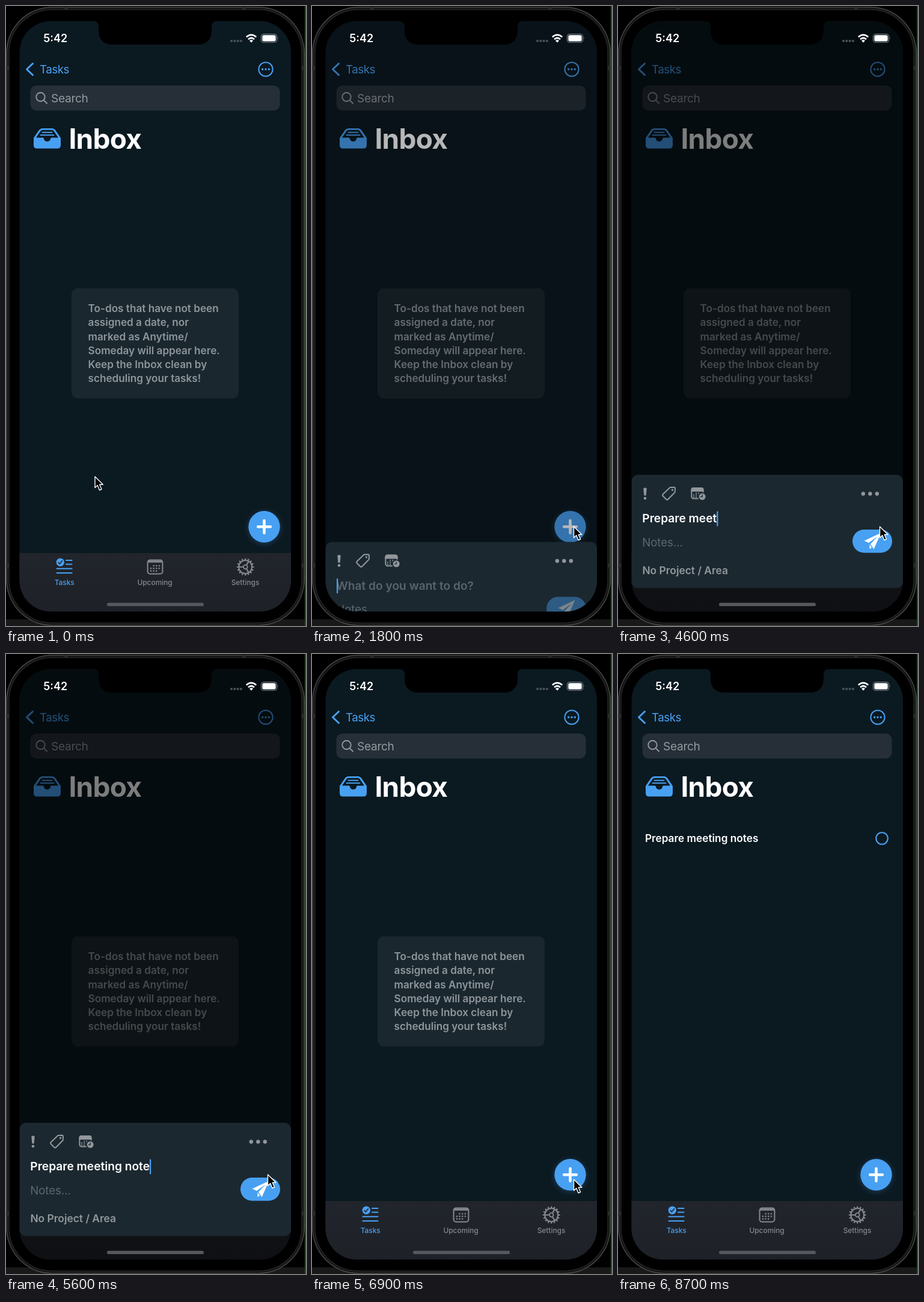
An HTML page that plays this animation: 499 px wide and 1029 px high, repeating every 9.23 s.

```html
<!DOCTYPE html>
<html lang="en">
<head>
<meta charset="utf-8">
<title>Inbox quick entry</title>
<style>
  html, body { margin: 0; width: 100%; height: 100%; overflow: hidden; background: #000; }
  svg { display: block; width: 499px; height: 1029px; }
  text { font-family: Inter, Roboto, "Open Sans", sans-serif; white-space: pre; }
  .line { fill: none; stroke-linecap: round; stroke-linejoin: round; }
  .semi { font-weight: 600; }
  .tab { font-size: 11.9px; font-weight: 500; text-anchor: middle; }
</style>
</head>
<body>
<svg viewBox="0 0 499 1029" xmlns="http://www.w3.org/2000/svg">
  <defs>
    <clipPath id="screen"><rect x="22.5" y="25" width="451.5" height="980" rx="52"/></clipPath>
    <filter id="glow" x="-50%" y="-50%" width="200%" height="200%"><feGaussianBlur stdDeviation="5"/></filter>
    <linearGradient id="barFill" x2="0" y2="1">
      <stop offset="0" stop-color="#21252c"/><stop offset="1" stop-color="#1e2127"/>
    </linearGradient>
  </defs>

  <!-- Phone body -->
  <rect width="499" height="1029" fill="#000"/>
  <rect y="1018" width="499" height="11" fill="#191919"/>
  <rect x="1" y="2" width="495" height="1026" rx="76" fill="#151515" stroke="#484848" stroke-width="1.6"/>
  <rect x="5" y="6" width="487" height="1018" rx="72" fill="#000" stroke="#262626" stroke-width="1.4"/>
  <g fill="#2b2b2b">
    <rect x="97" y="2" width="6" height="4"/><rect x="393" y="2" width="6" height="4"/>
    <rect x="1" y="99" width="4" height="7"/><rect x="492" y="99" width="4" height="7"/>
    <rect x="1" y="925" width="4" height="7"/><rect x="492" y="925" width="4" height="7"/>
  </g>
  <rect x="497" width="2" height="1029" fill="#08650f"/>

  <g clip-path="url(#screen)">
    <rect x="22" y="25" width="453" height="981" fill="#0b1921"/>

    <!-- Navigation and search -->
    <g class="line" stroke="#48a0f2">
      <path d="M44.5 95.5 L34.5 105 L44.5 114.5" stroke-width="3"/>
      <circle cx="432" cy="105" r="11.6" stroke-width="2"/>
    </g>
    <g fill="#48a0f2">
      <circle cx="426.7" cy="105" r="1.7"/><circle cx="432" cy="105" r="1.7"/><circle cx="437.3" cy="105" r="1.7"/>
      <text x="56" y="112" font-size="18.8" letter-spacing="-.5">Tasks</text>
    </g>
    <rect x="40.5" y="132" width="415" height="41.5" rx="10" fill="#262f37"/>
    <g class="line" stroke="#929aa0" stroke-width="1.9">
      <circle cx="57.5" cy="151" r="7.2"/><path d="M62.8 156.3 L68 161.5"/>
    </g>
    <text x="75" y="160" font-size="19.2" letter-spacing="-.35" fill="#929aa0">Search</text>

    <!-- Heading -->
    <path d="M46 219 L54.5 206.5 Q57 203 61 203 H76 Q80 203 82.5 206.5 L91 219 V231 Q91 236.5 85.5 236.5 H51.5 Q46 236.5 46 231 Z" fill="#48a0f2"/>
    <path d="M50 218.5 L57.5 207.5 Q58.7 205.8 61 205.8 H76 Q78.3 205.8 79.5 207.5 L87 218.5 H76 Q74 218.5 74 220 A5.5 5 0 0 1 63 220 Q63 218.5 61 218.5 Z" fill="#0b1921"/>
    <path class="line" d="M60.5 209.7 H76.5 M57.5 214.3 H79.5" stroke="#48a0f2" stroke-width="2"/>
    <text x="104.4" y="236.5" font-size="46" font-weight="700" letter-spacing="-.75" fill="#fff">Inbox</text>

    <g id="hint">
      <rect x="109" y="468.5" width="278" height="183" rx="11" fill="#1a272e"/>
      <g id="hintLines" class="semi" font-size="17.15" fill="#8e969b"></g>
    </g>
    <g id="task">
      <text class="semi" x="44.9" y="312" font-size="17.25" fill="#fff">Prepare meeting notes</text>
      <circle class="line" cx="439" cy="306" r="9.8" stroke="#48a0f2" stroke-width="2.1"/>
    </g>

    <!-- Tab bar -->
    <rect x="22" y="908" width="453" height="98" fill="url(#barFill)"/>
    <circle cx="90.3" cy="923.3" r="6.7" fill="#48a0f2"/>
    <path class="line" d="M87.2 923.6 L89.4 926 L93.4 920.8" stroke="#20252c" stroke-width="1.6"/>
    <path class="line" d="M100 920 H109.5 M100 926.5 H109.5 M84.5 933.8 H109.5 M84.5 941 H109.5" stroke="#48a0f2" stroke-width="2.1"/>
    <g class="line" stroke="#85898d">
      <rect x="235.6" y="919.5" width="24.8" height="23" rx="4" stroke-width="2"/>
      <path d="M237 922 H259" stroke-width="3.4"/>
      <path id="gear" stroke-width="2.2" stroke-linecap="butt"/>
      <circle cx="398.2" cy="931" r="11" stroke-width="2.2"/>
      <circle cx="398.2" cy="931" r="3.3" stroke-width="1.8"/>
    </g>
    <g id="monthDots" fill="#85898d"></g>
    <text class="tab" x="97.2" y="961" fill="#48a0f2">Tasks</text>
    <text class="tab" x="247.6" y="961" fill="#85898d">Upcoming</text>
    <text class="tab" x="398" y="961" fill="#85898d">Settings</text>

    <!-- Add button -->
    <circle cx="429.5" cy="866" r="27" fill="#48a0f2" opacity=".25" filter="url(#glow)"/>
    <circle cx="429.5" cy="864.3" r="26.2" fill="#48a0f2"/>
    <path class="line" d="M419.2 864.3 H439.8 M429.5 854 V874.6" stroke="#fff" stroke-width="4.6"/>

    <rect id="shade" x="22" y="25" width="453" height="981" fill="#000"/>
    <rect x="168" y="990.5" width="161" height="5.6" rx="2.8" fill="#55585d"/>

    <!-- Entry sheet -->
    <g id="sheet">
      <rect x="22.5" y="778" width="451.5" height="188" rx="11" fill="#1b2830"/>
      <g fill="#91979b">
        <path d="M42.3 801 Q42.3 799.5 45 799.5 Q47.7 799.5 47.7 801 L46.6 812.5 H43.4 Z"/><circle cx="45" cy="817" r="2.3"/>
        <circle cx="407.8" cy="809.5" r="3.2"/><circle cx="419.3" cy="809.5" r="3.2"/><circle cx="430.8" cy="809.5" r="3.2"/>
        <path d="M121.5 803 Q121.5 799 125.5 799 H138.5 Q142.5 799 142.5 803 V806 H121.5 Z"/>
      </g>
      <g class="line" stroke="#91979b" stroke-width="2">
        <path d="M86.5 799 L93 798.8 Q95 798.8 95 801 L94.7 807 L83.5 818.5 Q81.8 820.2 80 818.5 L75 813.5 Q73.3 811.7 75 810 Z"/>
        <circle cx="90.5" cy="803.3" r="1" stroke-width="1.4"/>
        <rect x="122.4" y="800" width="19.2" height="17.6" rx="3.2"/>
      </g>
      <g id="sheetDots" fill="#91979b"></g>
      <circle cx="140.2" cy="814.3" r="6.4" fill="#91979b" stroke="#1b2830" stroke-width="1.8"/>
      <path class="line" d="M140.2 811 V814.5 H137.5" stroke="#1b2830" stroke-width="1.3"/>
      <text id="placeholder" class="semi" x="40.3" y="857" font-size="19.15" fill="#59646b">What do you want to do?</text>
      <text id="title" class="semi" x="40.3" y="857" font-size="19.15" fill="#fff"></text>
      <rect id="caret" y="838.5" width="2.2" height="25" rx="1" fill="#48a0f2"/>
      <text x="40.2" y="896.5" font-size="18.6" fill="#5d676d">Notes...</text>
      <text class="semi" x="40.4" y="943" font-size="17.4" fill="#91979b">No Project / Area</text>
      <g id="send">
        <rect x="390" y="869" width="66" height="38.5" rx="19.2" fill="#48a0f2"/>
        <path d="M437.5 874.5 L409.5 887.5 L417 891 L431.5 880.5 L420 893 L425.5 901.5 Z M418.5 893.5 L422.2 899 L418.5 901 Z" fill="#fff"/>
      </g>
    </g>
  </g>

  <!-- Notch and status bar -->
  <path d="M145 24 V25 Q154 25 154 34 V40 Q154 64 178 64 H318 Q342 64 342 40 V34 Q342 25 351 25 V24 Z" fill="#000"/>
  <text class="semi" x="62.3" y="60" font-size="18" fill="#fff">5:42</text>
  <g fill="#48535a">
    <circle cx="375" cy="58" r="2.1"/><circle cx="380.3" cy="58" r="2.1"/><circle cx="385.6" cy="58" r="2.1"/><circle cx="390.9" cy="58" r="2.1"/>
  </g>
  <g fill="none" stroke="#fff" stroke-width="2.7">
    <path d="M399.8 51.5 Q408 44.3 416.2 51.5"/><path d="M403 55.2 Q408 50.8 413 55.2"/>
  </g>
  <path d="M405 57.5 Q408 55 411 57.5 L408 60.7 Z" fill="#fff"/>
  <rect x="424.5" y="46.5" width="26" height="14" rx="4.3" fill="none" stroke="#79828a" stroke-width="1.2"/>
  <rect x="426.3" y="48.2" width="22.4" height="10.6" rx="2.7" fill="#fff"/>
  <path d="M452 51.3 Q453.8 53.5 452 55.8 Z" fill="#79828a"/>

  <circle id="tap" r="23.5" fill="#bcbebf" opacity=".82"/>
  <path id="pointer" d="M0 0 V18.5 L4.2 14.6 L7.5 22.5 L11 21 L7.7 13.3 H13.3 Z" fill="#000" stroke="#fff" stroke-width="1.4" stroke-linejoin="round"/>
</svg>

<script>
const LOOP = 9230, STEP = 100;
const el = id => document.getElementById(id);
const set = (id, name, value) => el(id).setAttribute(name, value);
const show = (id, visible) => el(id).style.display = visible ? '' : 'none';
const clamp = v => Math.max(0, Math.min(1, v));
const progress = (t, from, to) => clamp((t - from) / (to - from));
const smooth = p => p * p * (3 - 2 * p);
const mix = (a, b, p) => a + (b - a) * p;

function dotGrid(id, x, y, dx, dy, r) {
  let out = '';
  for (let row = 0; row < 3; row++)
    for (let col = 0; col < 4; col++) {
      const missing = (row === 0 && col === 0) || (row === 2 && col === 3);
      if (!missing) out += `<circle cx="${x + col * dx}" cy="${y + row * dy}" r="${r}"/>`;
    }
  el(id).innerHTML = out;
}

function buildStatic() {
  const lines = ['To-dos that have not been', 'assigned a date, nor', 'marked as Anytime/',
    'Someday will appear here.', 'Keep the Inbox clean by', 'scheduling your tasks!'];
  el('hintLines').innerHTML = lines.map((s, i) =>
    `<text x="136.6" y="${508 + i * 23.25}">${s}</text>`).join('');
  dotGrid('monthDots', 241, 929, 4.6, 4.3, 1.3);
  dotGrid('sheetDots', 126, 808.5, 4.1, 3.2, 1.1);

  const ray = (angle, r1, r2) => {
    const c = Math.cos(angle), s = Math.sin(angle);
    return `M${398.2 + r1 * c} ${931 + r1 * s} L${398.2 + r2 * c} ${931 + r2 * s}`;
  };
  let d = '';
  for (let i = 0; i < 16; i++) d += ray(i * Math.PI / 8, 11.5, 14.3);
  for (let i = 0; i < 3; i++) d += ray(Math.PI + i * Math.PI * 2 / 3, 4, 10.5);
  set('gear', 'd', d);
}

const FULL_TITLE = 'Prepare meeting notes';
// Times at which typed characters appear; "in" lands together.
const KEY_TIMES = [2700, 2900, 3000, 3200, 3300, 3500, 3600, 4000, 4200, 4300, 4500,
  4600, 4800, 4800, 5000, 5100, 5300, 5400, 5500, 5600, 5900];

function pointerAt(t) {
  const arrive = smooth(progress(t, 0, 500));
  const nudge = smooth(progress(t, 6300, 6600));
  const leave = progress(t, 6900, 7300) ** 2;
  return [
    mix(mix(148, 435.5, arrive), 515, leave),
    mix(mix(781, 864, arrive) + 8 * nudge, 1045, leave)
  ];
}

function render(time) {
  const t = Math.floor(time / STEP) * STEP;

  const [x, y] = pointerAt(t);
  set('pointer', 'transform', `translate(${x} ${y})`);
  show('pointer', t < 7300);
  set('tap', 'cx', x - 1);
  set('tap', 'cy', y + 1.5);
  show('tap', t === 1700 || t === 6700 || t === 6800);

  const sheetOpen = t >= 1800 && t < 6900;
  const rise = 1 - (1 - progress(t, 1700, 2000)) ** 2;
  show('sheet', sheetOpen);
  set('sheet', 'transform', `translate(0 ${251 * (1 - rise)})`);
  set('shade', 'opacity', sheetOpen ? .51 * rise : 0);

  const typed = KEY_TIMES.filter(k => k <= t).length;
  const title = el('title');
  title.textContent = FULL_TITLE.slice(0, typed);
  show('placeholder', typed === 0);
  if (sheetOpen) set('caret', 'x', typed ? 40.3 + title.getComputedTextLength() : 41);
  const blink = typed ? progress(t, 6300, 6600) : progress(t, 2200, 2500);
  set('caret', 'opacity', 1 - blink);
  set('send', 'opacity', typed === 0 || t >= 6700 ? .43 : 1);

  const swap = progress(t, 7400, 7900);
  set('hint', 'opacity', 1 - swap);
  set('task', 'opacity', swap);
}

buildStatic();
const start = performance.now();
function frame() {
  render((performance.now() - start) % LOOP);
  requestAnimationFrame(frame);
}
frame();
</script>
</body>
</html>
```
